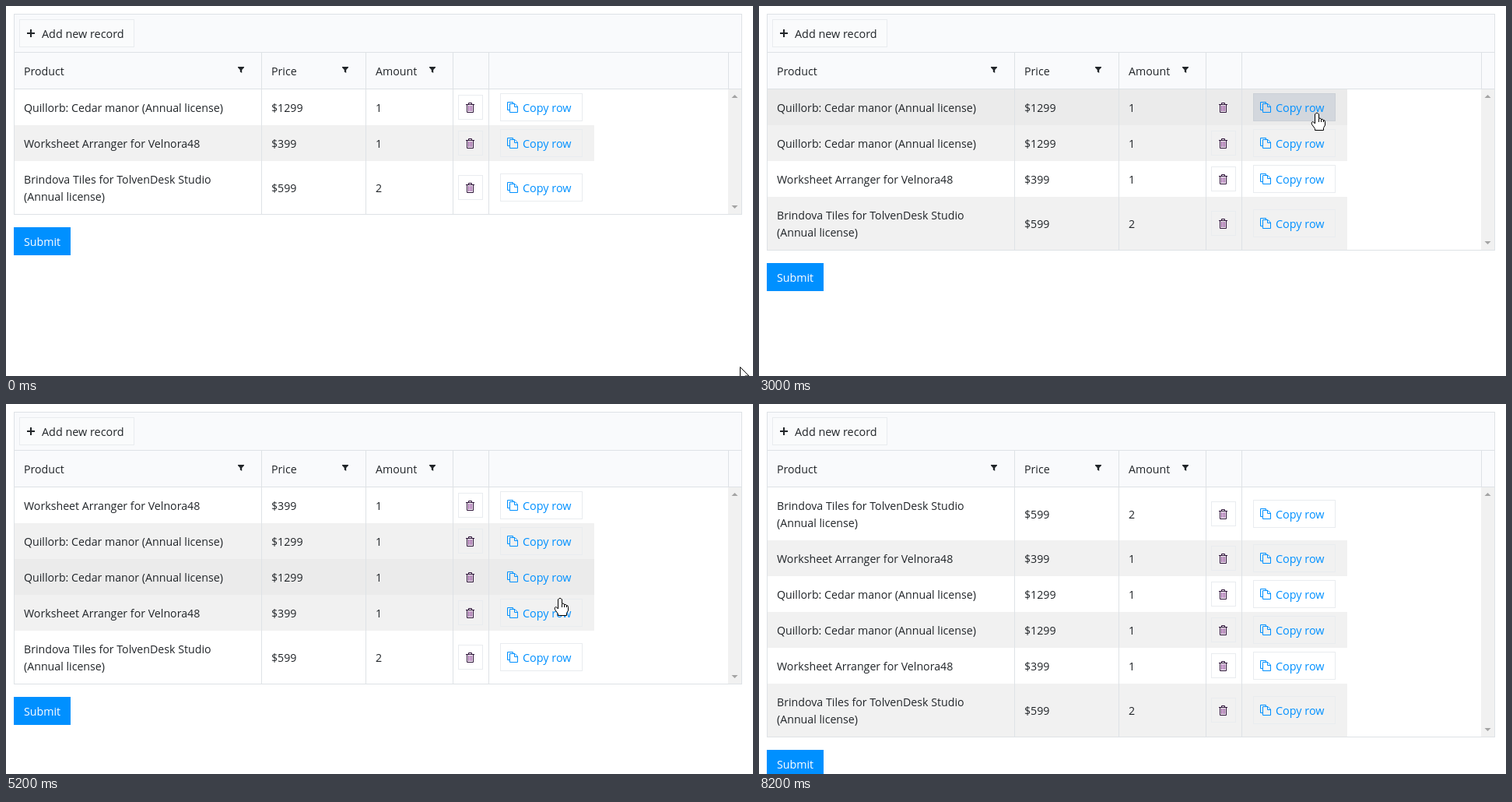
Write an HTML page with a canvas that moves like this. It is 960 px wide and 475 px high and loops after 8940 ms.

```html
<!DOCTYPE html>
<html lang="en">
<head>
<meta charset="utf-8">
<title>Copy rows in a table</title>
<style>
html, body { margin: 0; width: 100%; height: 100%; overflow: hidden; background: #fff; }
canvas { display: block; width: 960px; height: 475px; }
</style>
</head>
<body>
<canvas id="stage" width="960" height="475"></canvas>
<script>
const ctx = document.getElementById('stage').getContext('2d');
const LOOP = 8940, TICK = 200 / 3;
const INK = '#212529', BLUE = '#0090ff', LINE = '#dee2e6', EDGE = '#e9ecef';
const TOP = 107, COLUMNS = [328, 462, 574, 620];

const desk = { lines: ['Quillorb: Cedar manor (Annual license)'], price: '$1299', amount: '1' };
const sheet = { lines: ['Worksheet Arranger for Velnora48'], price: '$399', amount: '1' };
const tiles = { lines: ['Brindova Tiles for TolvenDesk Studio', '(Annual license)'], price: '$599', amount: '2' };

// Each click presses the button, then puts the copy on top.
const CLICKS = [
  { press: 25, add: 27, item: desk },
  { press: 59, add: 61, item: sheet },
  { press: 92, add: 93, item: tiles }
];

const linear = u => u;
const slowOut = u => 1 - (1 - u) ** 2;
const smooth = u => u * u * (3 - 2 * u);
const smoother = u => u ** 3 * (u * (6 * u - 15) + 10);

// tick, x, y of the pointer tip, easing towards that point
const PATH = [
  [0, 943, 463, linear],
  [19, 719, 130, smoother],
  [44, 719, 130, linear],
  [45, 717, 137, linear],
  [58, 712, 232, slowOut],
  [74, 712, 232, linear],
  [88, 714, 316, smooth],
  [89, 715, 317, linear],
  [110, 715, 317, linear],
  [111, 714, 323, linear],
  [123, 702, 480, linear],
  [140, 702, 480, linear]
];

const HAND = new Path2D('M-2.5 2Q0-1.4 2.5 2V7.2H4Q5.3 7.2 5.5 8.5Q8 7.8 8.2 9.6Q10.5 9.3 10.5 11.5V16L8.5 19.5V22.5H-2.5V20.5L-6.6 14.8Q-7.6 11.8-5.4 11.6Q-4 11.8-2.5 14Z');
const KNUCKLES = new Path2D('M2.5 7.5V12M5.5 8.5V12M8.5 9.6V12');
const ARROW = new Path2D('M.5.5V16.5L4.2 13L6.8 18.7L9.2 17.6L6.7 12H11.8Z');
const TRASH = new Path2D('M-5.5-3.5H5.5M-2-4V-5.5H2V-4M-4-3V6.5H4V-3');
const BARS = new Path2D('M-2-2V5M0-2V5M2-2V5');
const PAGES = new Path2D('M-3.5 3.5H-6.5V-6.5H.5V-4.5M-3.5-4.5H3L6.5-1V6.5H-3.5ZM2.5-4.5V-.5H6.5');
const FUNNEL = new Path2D('M-4-4H4V-3L1.2 0V4L-1.2 2.5V0L-4-3Z');

function rect(x, y, w, h, color) {
  ctx.fillStyle = color;
  ctx.fillRect(x, y, w, h);
}

function frame(x, y, w, h, color) {
  ctx.strokeStyle = color;
  ctx.lineWidth = 1;
  ctx.strokeRect(x + .5, y + .5, w - 1, h - 1);
}

function text(str, x, mid, color = INK, size = 14.2) {
  ctx.font = `${size}px "Open Sans", "Noto Sans", sans-serif`;
  ctx.fillStyle = color;
  ctx.fillText(str, x, mid + 6);
}

function shape(path, x, y, { fill, stroke, width = 1 }) {
  ctx.save();
  ctx.translate(x, y);
  if (fill) { ctx.fillStyle = fill; ctx.fill(path); }
  if (stroke) { ctx.strokeStyle = stroke; ctx.lineWidth = width; ctx.stroke(path); }
  ctx.restore();
}

function pointerAt(n) {
  const i = Math.max(1, PATH.findIndex(p => p[0] >= n));
  const [n0, x0, y0] = PATH[i - 1], [n1, x1, y1, ease] = PATH[i];
  const u = ease(Math.max(0, (n - n0) / (n1 - n0)));
  return { x: Math.round(x0 + (x1 - x0) * u), y: Math.round(y0 + (y1 - y0) * u) };
}

function rowsAt(n) {
  const items = [desk, sheet, tiles];
  for (const c of CLICKS) if (n >= c.add) items.unshift(c.item);
  let y = TOP;
  return items.map(item => {
    const h = 24 + 22 * item.lines.length;
    const row = { item, y, h, mid: y + h / 2 };
    y += h;
    return row;
  });
}

const overRow = (p, r) => p.x >= 11 && p.x < 756 && p.y >= r.y && p.y < r.y + r.h;
const overCopy = (p, r, slack = 0) =>
  p.x >= 635 && p.x < 741 && p.y >= r.mid - 18 - slack && p.y < r.mid + 18;

function drawHeader() {
  rect(10, 10, 936, 97, '#f9fafc');
  rect(17, 17, 148, 36, '#fafbfc');
  frame(17, 17, 148, 36, EDGE);
  rect(27, 34, 10, 2, INK);
  rect(31, 30, 2, 10, INK);
  text('Add new record', 46, 35, INK, 14.4);
  rect(10, 59, 936, 1, LINE);
  rect(10, 106, 936, 1, LINE);
  [['Product', 23, 302], ['Price', 341, 436], ['Amount', 475, 548]].forEach(([name, x, icon]) => {
    text(name, x, 83);
    shape(FUNNEL, icon, 82, { fill: INK });
  });
  rect(928, 60, 1, 46, LINE);
}

function drawRow({ item, y, h, mid }, striped, onRow, onCopy, pressed) {
  if (onRow) rect(11, y, 745, h, '#ebebeb');
  else if (striped) rect(11, y, 745, h, '#f1f1f1');

  item.lines.forEach((line, i) => text(line, 23, y + 23 + 22 * i));
  text(item.price, 341, mid);
  text(item.amount, 475, mid);

  const edge = onRow ? '#ebebeb' : EDGE;
  frame(581, mid - 16, 32, 32, edge);
  shape(BARS, 596.5, mid, { stroke: '#8a3d93' });
  shape(TRASH, 596.5, mid, { stroke: '#2d1238' });

  if (onCopy) {
    if (pressed) rect(633, mid - 20, 110, 40, '#c7d7e5');
    rect(635, mid - 18, 106, 36, pressed ? '#ced4da' : '#d3d7dd');
  }
  frame(635, mid - 18, 106, 36, onCopy ? '#cbd0d6' : edge);
  shape(PAGES, 651, mid, { stroke: BLUE });
  text('Copy row', 664, mid, BLUE, 14.4);
}

function triangle(x, y, dir) {
  ctx.fillStyle = '#a3a3a3';
  ctx.beginPath();
  ctx.moveTo(x - 4, y + 2 * dir);
  ctx.lineTo(x + 4, y + 2 * dir);
  ctx.lineTo(x, y - 2 * dir);
  ctx.fill();
}

function draw(n) {
  rect(0, 0, 960, 475, '#fff');
  const rows = rowsAt(n), last = rows[rows.length - 1], bottom = last.y + last.h;
  const tip = pointerAt(n);
  const hover = pointerAt(n - 1); // highlights trail the pointer by one tick
  const pressed = CLICKS.some(c => n >= c.press && n < c.add);

  drawHeader();
  rows.forEach((row, i) => drawRow(row, i % 2, overRow(hover, row), overCopy(hover, row), pressed));

  for (const x of COLUMNS) rect(x, 60, 1, bottom - 60, LINE);
  rect(928, TOP, 17, bottom - TOP, '#f1f1f1');
  triangle(936.5, 116, 1);
  triangle(936.5, bottom - 9, -1);
  frame(10, 10, 936, bottom - 9, LINE);

  rect(10, bottom + 17, 73, 36, BLUE);
  text('Submit', 23, bottom + 35, '#fff');

  const style = { fill: '#fff', stroke: '#000' };
  if (rows.some(row => overCopy(tip, row, 2))) {
    shape(HAND, tip.x, tip.y, style);
    shape(KNUCKLES, tip.x, tip.y, style);
  } else {
    shape(ARROW, tip.x, tip.y, style);
  }
}

function play() {
  draw(Math.floor((performance.now() % LOOP + 4) / TICK));
  requestAnimationFrame(play);
}
play();
</script>
</body>
</html>
```
